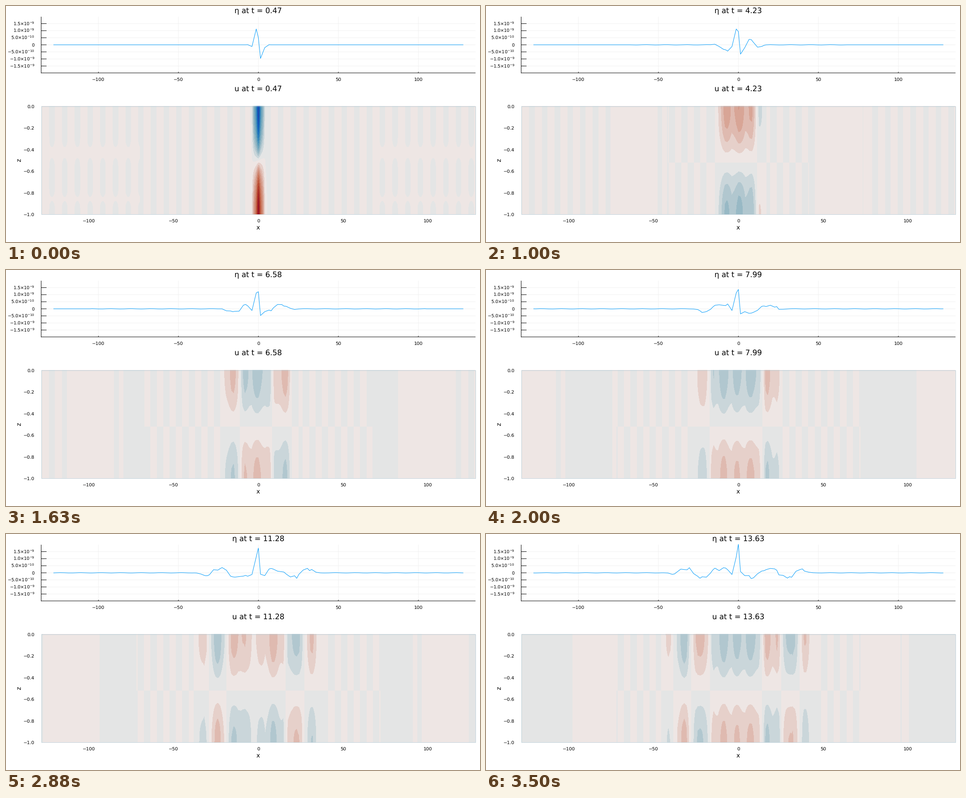
Animation, 1058 px wide and 529 px high, one loop 3620 ms. Source, as a matplotlib script:

```python
import numpy as np
import matplotlib.pyplot as plt
from matplotlib.animation import FuncAnimation
from matplotlib.colors import BoundaryNorm, LinearSegmentedColormap, ListedColormap
from matplotlib.patches import Rectangle

W, H, DPI = 1058, 529, 100
FRAMES, LOOP_MS, STEP = 29, 3620, 0.47
LEFT, RIGHT, TOP, BOTTOM = 79, 1048, 224, 467
MID = 563.3

# Internal wave: speed, time between sign changes, size of the near field
SPEED, HALF_PERIOD, NEAR, SHIFT = 3.8, 2.85, 7.5, 1.3
SURFACE_SPEED, SURFACE_LENGTH = 16, 64

plt.rcParams["font.family"] = "DejaVu Sans"
plt.rcParams["text.hinting"] = "none"

# Irregular sampling positions shared by both panels
NODES = np.array([8 * m + o for m in range(-16, 17) for o in (0, 4 / 3, 4, 20 / 3)])
NODES = NODES[NODES <= 128]
X = np.linspace(-128, 128, RIGHT - LEFT)
Z = np.linspace(0, -1, BOTTOM - TOP)[:, None]

rng = np.random.default_rng(4)
JITTER_PHASE = rng.uniform(0, 2 * np.pi, len(NODES))


def wave_front(t):
    return np.exp(-(abs(NODES) / (0.3 + 3.1 * t)) ** (1 + t))


def wave_profile(t):
    """Strength of the internal wave at the nodes, in colour levels."""
    r = ((NODES + SHIFT * (1 - np.exp(-t))) ** 4 + NEAR ** 4) ** 0.25
    phase = np.pi * (t - 1 - r / SPEED) / HALF_PERIOD
    strength = 2.7 + 29 * np.exp(-0.75 * t)
    texture = 1 + 0.2 * np.cos(2 * np.pi * NODES / 8)
    return strength / 1.2 * texture * np.tanh(2 * np.sin(phase)) * wave_front(t) * (1 + 0.2 * np.exp(-t))


def surface(t, profile):
    """Elevation: a growing central spike and waves odd in x."""
    eta = 0.12 * np.sign(NODES) * np.clip(profile, -3.5, 3.5)
    eta += 0.11 * wave_front(t) * np.sin(0.9 * t + JITTER_PHASE)
    ripple = 0.012 * np.sin(0.5 * abs(NODES) - 2 * t)
    eta += ripple * (abs(NODES) > 3.2 * t) * (abs(NODES) < SURFACE_SPEED * t)
    spike = {-4: -0.12, -4 / 3: 1.12, 0: 0.45 + 0.115 * t, 4 / 3: -1 + 0.08 * t, 4: -0.2}
    for x, value in spike.items():
        eta[np.argmin(abs(NODES - x))] = value
    return eta


def velocity(t, profile):
    r = abs(X)
    fade = max(0, 1 - (t - STEP) / 2)
    inner = r < min(11 * t - 5, 72)
    reached = r < SURFACE_SPEED * t + 8
    stripes = np.sin(2 * np.pi * X / 7.5)
    swell = np.sin(2 * np.pi * (r - SURFACE_SPEED * t + 22.8) / SURFACE_LENGTH)

    mode = np.interp(X, NODES, profile) + 0.25 * inner * stripes
    flat = ~inner * np.where(reached & (t > 1), 0.12 * stripes + 0.35 * swell, 0.25 * stripes + 0.05)
    bands = np.exp(-((Z + 0.43) / 0.06) ** 2) + 0.6 * np.exp(-((Z + 0.86) / 0.04) ** 2)
    shape = np.cos(np.pi * Z) + 0.065 - 0.055 * fade
    return mode * shape + flat + 0.4 * fade * bands * (r > 70)


def ramp(colors):
    return LinearSegmentedColormap.from_list("ramp", colors)(np.linspace(0, 1, 16))


reds = ramp(["#eee6e4", "#d8a596", "#cb7a60", "#bb4f33", "#ab2a24", "#960f26"])
blues = ramp(["#e4e5e5", "#98b9c5", "#5f9fba", "#2b80ba", "#0e62be", "#1c45ad"])
cmap = ListedColormap(np.vstack([blues[::-1], reds]))
norm = BoundaryNorm(np.arange(-16, 17), cmap.N)

fig = plt.figure(figsize=(W / DPI, H / DPI), dpi=DPI, facecolor="white")
ax = fig.add_axes([0, 0, 1, 1])
image = ax.imshow(np.zeros((BOTTOM - TOP, RIGHT - LEFT)), cmap=cmap, norm=norm, aspect="auto",
                  interpolation="nearest", extent=(LEFT, RIGHT, BOTTOM, TOP))
ax.set_xlim(0, W)
ax.set_ylim(H, 0)
ax.axis("off")


def px(size):
    return size * 72 / DPI


def label(x, y, text, size=10.2, ha="center", va="baseline", **kw):
    return ax.text(x, y, text, fontsize=px(size), ha=ha, va=va, color="black", **kw)


def segment(xs, ys, color="black", z=3):
    ax.plot(xs, ys, color=color, lw=px(1), zorder=z, solid_capstyle="butt", snap=False)


def eta_x(x):
    return MID + 3.57 * x


def eta_y(y):
    return 87 - 31.7 * y


def number(v):
    return str(v).replace("-", "\u2212")


for x in range(-100, 101, 50):
    segment([eta_x(x)] * 2, [24, 150], "#f1f1f1", z=1)
    segment([eta_x(x)] * 2, [147.5, 150])
    label(eta_x(x), 167.5, number(x))
    label(MID + 3.785 * x, 484.5, number(x))

for half in range(-3, 4):
    y = eta_y(half / 2)
    segment([79, 1048], [y, y], "#f1f1f1", z=1)
    segment([79, 90.5], [y, y])
    mantissa, power = (half / 2, 9) if abs(half) > 1 else (half * 5.0, 10)
    text = number(mantissa) + "×10$^{-%d}$" % power if half else "0"
    label(63.5, y + 4, text, 9.8, ha="right")

segment([78.5, 78.5], [24, 150.5])
segment([78, 1048], [150, 150])

for i in range(6):
    label(63.5, TOP + 4.5 + i * 48.5, number(-i / 5 if i else 0.0), ha="right")

ax.add_patch(Rectangle((LEFT - .5, TOP + .5), RIGHT - LEFT, BOTTOM - TOP - .5,
                       fill=False, ec="#b4cad5", lw=px(0.8), zorder=4))
label(563, 501, "x", 13.5)
label(30, 345.5, "z", 13.5, va="center", rotation=90)

curve, = ax.plot([], [], color="#009afa", lw=px(1), zorder=5)
eta_title = label(563, 16, "", 16.6)
u_title = label(563, 190.5, "", 16.6)


def update(frame):
    t = STEP * (frame + 1)
    profile = wave_profile(t)
    curve.set_data(eta_x(NODES), eta_y(surface(t, profile)))
    image.set_data(velocity(t, profile))
    eta_title.set_text(f"η at t = {t:.2f}")
    u_title.set_text(f"u at t = {t:.2f}")
    return curve, image, eta_title, u_title


anim = FuncAnimation(fig, update, frames=FRAMES, interval=LOOP_MS / FRAMES,
                     repeat=True, repeat_delay=0, blit=False)
plt.show()
```
